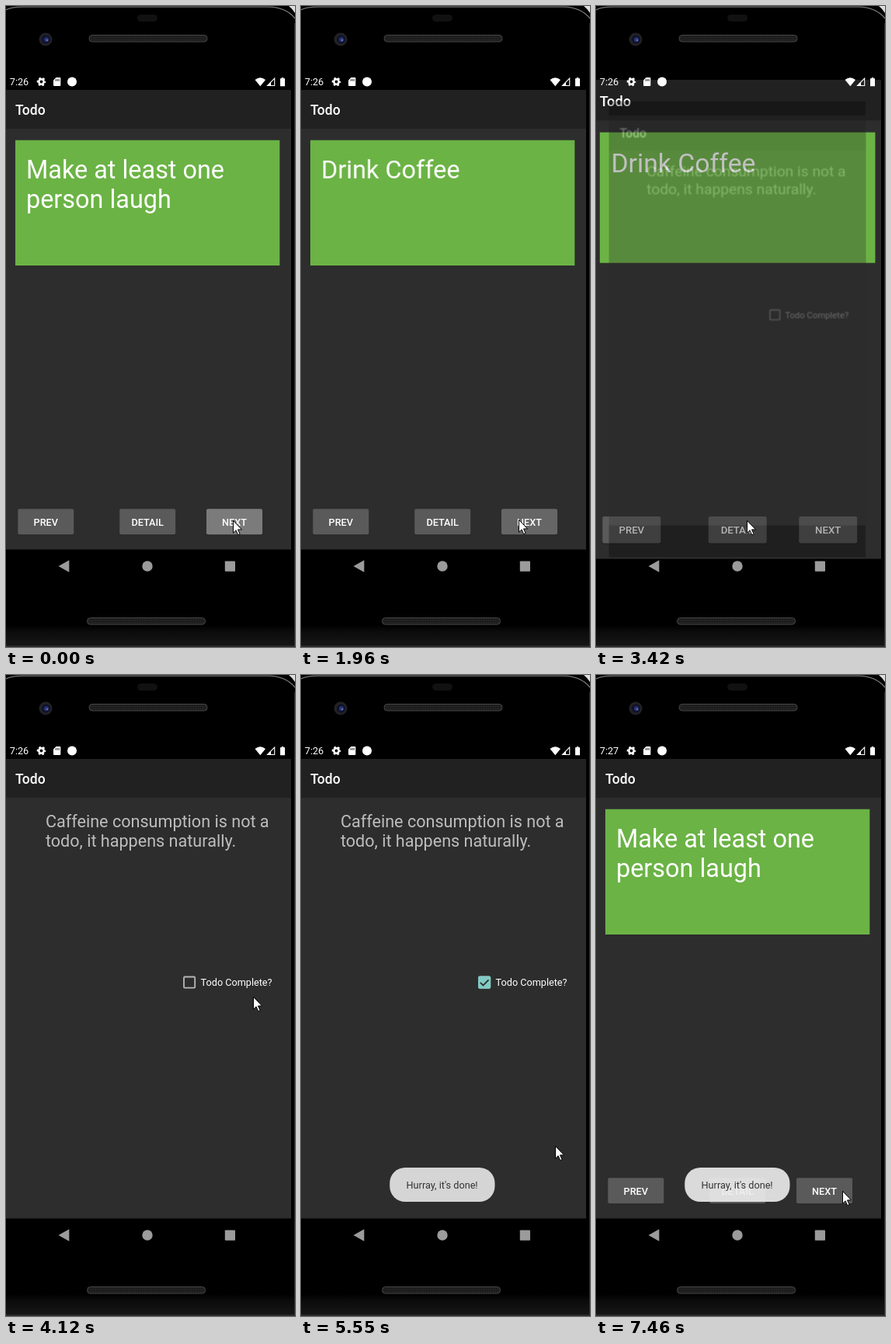
An HTML page for the animation above (8 s loop, 372 by 825 pixels).

```html
<!DOCTYPE html>
<html lang="en">
<head>
<meta charset="utf-8">
<title>Todo</title>
<style>
html, body { margin: 0; width: 100%; height: 100%; overflow: hidden; background: #000; }
svg { display: block; width: 372px; height: 825px; font-family: Roboto, sans-serif; }
.win { transform-origin: 182px 413px; }
.big { font-size: 32.4px; fill: #fff; }
.title { font-size: 17.5px; font-weight: 500; fill: #fff; }
.btn { font-size: 12.66px; font-weight: 500; fill: #fff; text-anchor: middle; }
.small { font-size: 12.66px; }
.note { font-size: 21.6px; fill: #bdbdbd; }

/* every change is a hard step, as in a screen capture */
.a { animation: 8s step-end infinite; }
#cursor { animation-name: cursor; }
#list { animation-name: list; }
#detail { animation-name: detail; }
#laugh { animation-name: laugh; }
#sleep { animation-name: sleep; }
#coffee { animation-name: coffee; }
#tick { animation-name: tick; }
#nextGlow { animation-name: nextGlow; }
#detailGlow { animation-name: detailGlow; }
#boxGlow { animation-name: boxGlow; }
#checked { animation-name: checked; }
#toast { animation-name: toast; }
#min6 { animation-name: min6; }
#min7 { animation-name: min7; }

@keyframes cursor {
  0% { transform: translate(292px, 662px); }
  12.5% { transform: translate(288px, 661px); }
  14.125% { transform: translate(283px, 660px); }
  24.5% { transform: translate(280px, 661px); }
  26.375% { transform: translate(226px, 662px); }
  28.25% { transform: translate(194px, 662px); }
  44.5% { transform: translate(206px, 640px); }
  46.25% { transform: translate(240px, 572px); }
  48% { transform: translate(280px, 490px); }
  49.75% { transform: translate(310px, 432px); }
  51.5% { transform: translate(318px, 414px); }
  53.25% { transform: translate(302px, 405px); }
  54.875% { transform: translate(288px, 400px); }
  62.125% { transform: translate(292px, 412px); }
  64% { transform: translate(304px, 462px); }
  65.75% { transform: translate(317px, 530px); }
  67.625% { transform: translate(325px, 586px); }
  69.375% { transform: translate(327px, 606px); }
  70.875% { transform: translate(286px, 622px); }
  72.375% { transform: translate(229px, 642px); }
  74.125% { transform: translate(245px, 655px); }
  75.75% { transform: translate(286px, 663px); }
  77.375% { transform: translate(311px, 664px); }
  79%, 100% { transform: translate(317px, 664px); }
}
@keyframes list {
  0% { transform: none; }
  42.75% { transform: scale(1.042); }
  44.5% { transform: scale(1.14); }
  70.875% { transform: scale(1.07); }
  72.375% { transform: scale(1.0055); }
  74.125% { transform: scale(1.001); }
  75.75%, 100% { transform: none; }
}
@keyframes detail {
  0% { opacity: 0; }
  42.75% { opacity: .3; transform: scale(.892); }
  44.5% { opacity: 1; transform: scale(.988); }
  46.25% { opacity: 1; transform: scale(.997); }
  48% { opacity: 1; transform: none; }
  70.875% { opacity: .6; transform: scale(.97); }
  72.375%, 100% { opacity: 0; }
}
@keyframes laugh { 0% { opacity: 1; } 5.5% { opacity: 0; } 86.5%, 100% { opacity: 1; } }
@keyframes sleep { 0% { opacity: 0; } 5.5% { opacity: 1; } 22.75%, 100% { opacity: 0; } }
@keyframes coffee { 0% { opacity: 0; } 22.75% { opacity: 1; } 86.5%, 100% { opacity: 0; } }
@keyframes tick { 0% { opacity: 0; } 70.875% { opacity: 1; } 86.5%, 100% { opacity: 0; } }
@keyframes nextGlow {
  0% { opacity: .2; }
  1.875% { opacity: .24; }
  5.5% { opacity: .16; }
  7.125% { opacity: .08; }
  8.75% { opacity: 0; }
  15.625% { opacity: .1; }
  17.25% { opacity: .2; }
  19.25% { opacity: .24; }
  22.75% { opacity: .16; }
  24.5% { opacity: .08; }
  26.375% { opacity: 0; }
  79% { opacity: .2; }
  86.5% { opacity: .16; }
  88.125% { opacity: .08; }
  89.875%, 100% { opacity: 0; }
}
@keyframes detailGlow {
  0% { opacity: 0; }
  31.625% { opacity: .2; }
  33.625% { opacity: .1; }
  35.375%, 100% { opacity: 0; }
}
@keyframes boxGlow {
  0% { opacity: 0; }
  56.75% { opacity: .1; }
  58.625% { opacity: .2; }
  62.125% { opacity: .1; }
  64%, 100% { opacity: 0; }
}
@keyframes checked { 0% { opacity: 0; } 60.375%, 100% { opacity: 1; } }
@keyframes toast {
  0% { opacity: 0; }
  65.75% { opacity: .4; }
  67.625% { opacity: .8; }
  69.375% { opacity: .97; }
  70.875%, 100% { opacity: 1; }
}
@keyframes min6 { 0% { opacity: 1; } 93.25%, 100% { opacity: 0; } }
@keyframes min7 { 0% { opacity: 0; } 93.25%, 100% { opacity: 1; } }
</style>
</head>
<body>
<svg viewBox="0 0 372 825">
  <defs>
    <clipPath id="screen"><rect y="87" width="367" height="658"/></clipPath>
    <linearGradient id="chin" x1="0" y1="0" x2="0" y2="1">
      <stop offset="0" stop-color="#000"/>
      <stop offset=".3" stop-color="#0b0b0b"/>
      <stop offset="1" stop-color="#161616"/>
    </linearGradient>
    <pattern id="mesh" width="3" height="3" patternUnits="userSpaceOnUse">
      <rect width="3" height="3" fill="#1c1c1c"/>
      <circle cx="1.5" cy="1.5" r=".8" fill="#2c2c2c"/>
    </pattern>
    <g id="window">
      <rect x="-3" y="87" width="370" height="658"/>
      <rect x="-3" y="108" width="370" height="591.5" fill="#2d2d2d"/>
      <rect x="-3" y="108" width="370" height="50" fill="#212121"/>
      <text class="title" x="12" y="140">Todo</text>
    </g>
    <g id="button">
      <rect y="1" width="72" height="33" rx="2" fill="#222"/>
      <rect width="72" height="33" rx="2" fill="#5a5a5a"/>
    </g>
  </defs>

  <!-- phone body -->
  <rect width="372" height="825"/>
  <path d="M364 0H372V9Q369 4 364 0Z" fill="#ddd"/>
  <path d="M0 5Q6 1.500 22 1.200H338Q360 1.500 372 16" fill="none" stroke="#777" stroke-width="1.300"/>
  <rect y="797" width="372" height="26" fill="url(#chin)"/>
  <path d="M0 824H372" stroke="#555"/>
  <path d="M371.500 22V823" stroke="#2e2e2e"/>
  <rect x="169" y="11" width="26" height="9" rx="4.500" fill="#111"/>
  <g fill="url(#mesh)" stroke="#474747">
    <rect x="107" y="37.500" width="152" height="8.500" rx="4"/>
    <rect x="104.500" y="787.500" width="152" height="8.500" rx="4"/>
  </g>
  <circle cx="51" cy="43" r="8.500" fill="#222226"/>
  <circle cx="51.500" cy="43" r="5.500" fill="#10122a"/>
  <circle cx="52" cy="43.300" r="3" fill="#2a3674"/>
  <circle cx="53" cy="44" r="1" fill="#7383d0"/>

  <!-- app -->
  <g clip-path="url(#screen)">
    <g id="list" class="win a">
      <use href="#window"/>
      <rect x="12" y="172.700" width="340.300" height="161.300" fill="#6bb345"/>
      <g class="big">
        <g id="laugh" class="a">
          <text x="26" y="221.800">Make at least one</text>
          <text x="26" y="259.800">person laugh</text>
        </g>
        <text id="sleep" class="a" x="26" y="221.800">Go to sleep</text>
        <text id="coffee" class="a" x="26" y="221.800">Drink Coffee</text>
      </g>
      <path id="tick" class="a" fill="#c4c4c4" stroke="#c4c4c4" stroke-width="1.200" stroke-linejoin="round" d="M170.500 469.500C171.500 467.800 174 467.500 175 468.500C176 470.500 176 472.500 177 474C182 464.500 187.500 457 195.500 453C189 460 183 470 179 479C177 481 174.500 481 173.500 480C172.500 476.500 171.500 473 170.500 469.500Z"/>
      <use href="#button" x="15.300" y="647.200"/>
      <use href="#button" x="146.200" y="647.200"/>
      <use href="#button" x="258" y="647.200"/>
      <rect id="detailGlow" class="a" x="146.200" y="647.200" width="72" height="33" rx="2" fill="#fff"/>
      <rect id="nextGlow" class="a" x="258" y="647.200" width="72" height="33" rx="2" fill="#fff"/>
      <g class="btn">
        <text x="51.300" y="668.500">PREV</text>
        <text x="182.200" y="668.500">DETAIL</text>
        <text x="294" y="668.500">NEXT</text>
      </g>
    </g>

    <g id="detail" class="win a">
      <use href="#window"/>
      <g class="note">
        <text x="50.900" y="196">Caffeine consumption is not a</text>
        <text x="50.900" y="221.300">todo, it happens naturally.</text>
      </g>
      <circle id="boxGlow" class="a" cx="236" cy="395.500" r="18" fill="#80cbc4"/>
      <rect x="229" y="388.500" width="14.200" height="14.200" rx="1.200" fill="none" stroke="#b8b8b8" stroke-width="1.800"/>
      <g id="checked" class="a">
        <rect x="228" y="387.500" width="16.200" height="16.200" rx="2" fill="#80cbc4"/>
        <path d="M230.800 395.800L234.500 399.400L241.500 392.300" fill="none" stroke="#2d2d2d" stroke-width="1.800"/>
      </g>
      <text class="small" x="250.600" y="400.400" fill="#fff">Todo Complete?</text>
    </g>
  </g>

  <!-- system bars -->
  <g fill="#fff">
    <g class="small">
      <text id="min6" class="a" x="4.800" y="102.300">7:26</text>
      <text id="min7" class="a" x="4.800" y="102.300">7:27</text>
    </g>
    <circle cx="45.500" cy="97.500" r="3.200" fill="none" stroke="#fff" stroke-width="2.600"/>
    <circle cx="45.500" cy="97.500" r="4.900" fill="none" stroke="#fff" stroke-width="1.800" stroke-dasharray="2.560 2.571" stroke-dashoffset="1.280"/>
    <path d="M64.500 92H69.500Q70.300 92 70.300 93V102Q70.300 103 69.300 103H62Q61 103 61 102V95.500Z"/>
    <path d="M64.200 94.200V96.600M66.200 94.200V96.600M68.200 94.200V96.600" stroke="#000" stroke-width=".9"/>
    <circle cx="85" cy="97.500" r="6"/>
    <path d="M320.500 95Q327.300 89.600 334 95L327.300 103.200Z"/>
    <path d="M345.700 93V102.500H336.500Z" fill="none" stroke="#fff" stroke-width="1.100"/>
    <path d="M341 98V102.500H336.500Z"/>
    <path d="M354.800 92H357.200V93.200H359V103.300H353V93.200H354.800Z"/>
  </g>
  <g fill="#9b9b9b">
    <path d="M67.500 721L81.300 713.200V728.800Z"/>
    <circle cx="182" cy="721" r="6.700"/>
    <rect x="281.800" y="714.500" width="13.200" height="13.200" rx=".8"/>
  </g>

  <g id="toast" class="a">
    <rect x="114.200" y="634" width="135.300" height="44" rx="20" fill="#eee" fill-opacity=".9"/>
    <text class="small" x="135.600" y="661" fill="#333">Hurray, it's done!</text>
  </g>

  <g id="cursor" class="a">
    <path d="M.5 .3V16.200L4.100 12.800L6.700 18.700L9.100 17.600L6.500 11.900H11.500Z" fill="#fff" stroke="#000" stroke-width="1"/>
  </g>
</svg>
</body>
</html>
```
